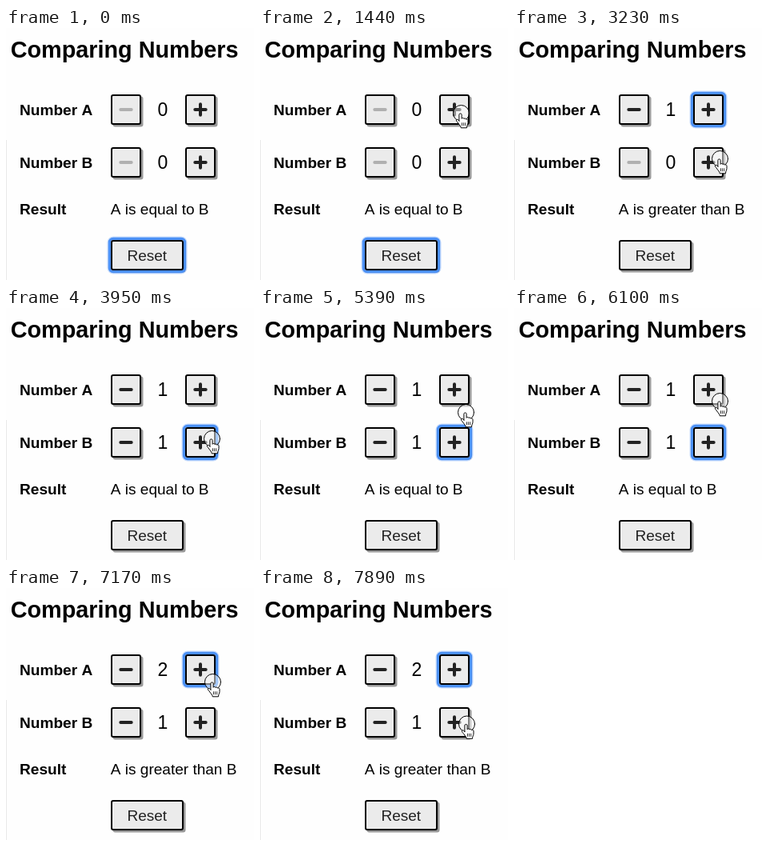
An HTML page that plays this animation: 310 by 315 pixels, repeating every 8000 ms.

```html
<!DOCTYPE html>
<html lang="en">
<head>
<meta charset="utf-8">
<title>Comparing Numbers</title>
<style>
  html, body { margin: 0; width: 100%; height: 100%; overflow: hidden; background: #fefefe; }
  svg { display: block; width: 310px; height: 315px; }
  text { font-family: "Liberation Sans", Arial, Helvetica, sans-serif; font-size: 19.05px; font-kerning: none; }
  .title { font-size: 28.8px; font-weight: bold; }
  .label { font-size: 19.1px; font-weight: bold; }
  .count { font-size: 23px; text-anchor: middle; }
  .shadow { fill: #999; }
  .face { fill: #ebebeb; stroke: #000; stroke-width: 2; }
  .glyph { stroke: #222; stroke-width: 4; stroke-linecap: round; fill: none; }
  .off { stroke: #b0b0b0; }
  .focus rect { fill: none; stroke: #4b90f5; }
</style>
</head>
<body>
<svg id="stage" viewBox="0 0 310 315">
  <rect y="140" width="1" height="175" fill="#e9e9e9"/>
  <text class="title" x="5.7" y="37">Comparing Numbers</text>
  <text class="label" x="17" y="108.8">Number A</text>
  <text class="label" x="17" y="174.8">Number B</text>
  <text class="label" x="17" y="233.3">Result</text>
  <text id="result" x="130.8" y="233.3"></text>
  <g id="controls"></g>
  <g id="cursor" stroke="#000" stroke-linejoin="round" stroke-linecap="round">
    <circle r="10" fill="#fff" fill-opacity=".5"/>
    <path fill="#fff" d="M-2.6 9.6V2a1.6 1.6 0 0 1 3.2 0V6.8c.4-1.2 2.7-1.1 2.9.3c.6-1 2.4-.7 2.6.6c.8-.8 2.4-.2 2.4 1.2V12c0 2.4-1.5 3.2-1.5 6.3H-.3c0-2.2-2-3.4-3.4-5.8C-4.8 10.8-6.6 9.7-6 8.4c.9-1.3 2.4-.2 3.4 1.2z"/>
    <path fill="none" stroke-width=".8" d="M1 12.2v3.2M3.1 12.2v3.2M5.2 12.2v3.2"/>
  </g>
</svg>
<script>
const LOOP = 8000;

// [time, left, top] of the pointer
const moves = [
  [1080, 273, 126], [1440, 241, 96], [2870, 241, 100], [3230, 247, 153],
  [5390, 247, 120], [5740, 247, 107], [6100, 247, 106], [7170, 248, 107],
  [7530, 257, 125], [7890, 248, 159.5]
];

// [time, A, B, focused control]
const clicks = [
  [0, 0, 0, 'reset'], [1790, 1, 0, 'plusA'],
  [3950, 1, 1, 'plusB'], [6460, 2, 1, 'plusA']
];

const $ = id => document.getElementById(id);

function button(id, x, y, w, content) {
  const box = (cls, grow, extra = '') =>
    `<rect class="${cls}" x="${x - grow}" y="${y - grow}" width="${w + 2 * grow}" height="${38 + 2 * grow}" rx="${3 + grow}" ${extra}/>`;
  return `<g>
    <rect class="shadow" x="${x + 2.5}" y="${y + 2.5}" width="${w}" height="38" rx="3"/>
    <g class="focus" id="focus-${id}">
      ${box('', 3, 'stroke-width="3" stroke-opacity=".3"')}
      ${box('', 1.6, 'stroke-width="3.2"')}
    </g>
    ${box('face', -1)}${content}</g>`;
}

function row(name, y) {
  const mid = y + 19;
  return button('minus' + name, 131, y, 38,
      `<path class="glyph" id="sign${name}" d="M143.3 ${mid}h13.4"/>`) +
    `<text class="count" id="count${name}" x="196" y="${mid + 8}"></text>` +
    button('plus' + name, 224, y, 38,
      `<path class="glyph" d="M236.3 ${mid}h13.4M243 ${mid - 6.7}v13.4"/>`);
}

$('controls').innerHTML = row('A', 83) + row('B', 149) +
  button('reset', 131, 265, 91,
    '<text x="176.3" y="291" text-anchor="middle" fill="#222">Reset</text>');

const current = (steps, t) => steps.filter(step => step[0] <= t).pop();
const rings = [...document.querySelectorAll('.focus')];

function render(t) {
  const [, a, b, focused] = current(clicks, t);
  for (const [name, value] of [['A', a], ['B', b]]) {
    $('count' + name).textContent = value;
    $('sign' + name).classList.toggle('off', value === 0);
  }
  $('result').textContent = a > b ? 'A is greater than B' : 'A is equal to B';
  for (const ring of rings) {
    ring.style.display = ring.id === 'focus-' + focused ? '' : 'none';
  }

  const spot = current(moves, t);
  const cursor = $('cursor');
  cursor.style.display = spot ? '' : 'none';
  if (spot) {
    cursor.setAttribute('transform', `translate(${spot[1] + 10.5} ${spot[2] + 10.5})`);
  }
}

const start = performance.now();
function tick() {
  render((performance.now() - start) % LOOP);
  requestAnimationFrame(tick);
}
tick();
</script>
</body>
</html>
```
